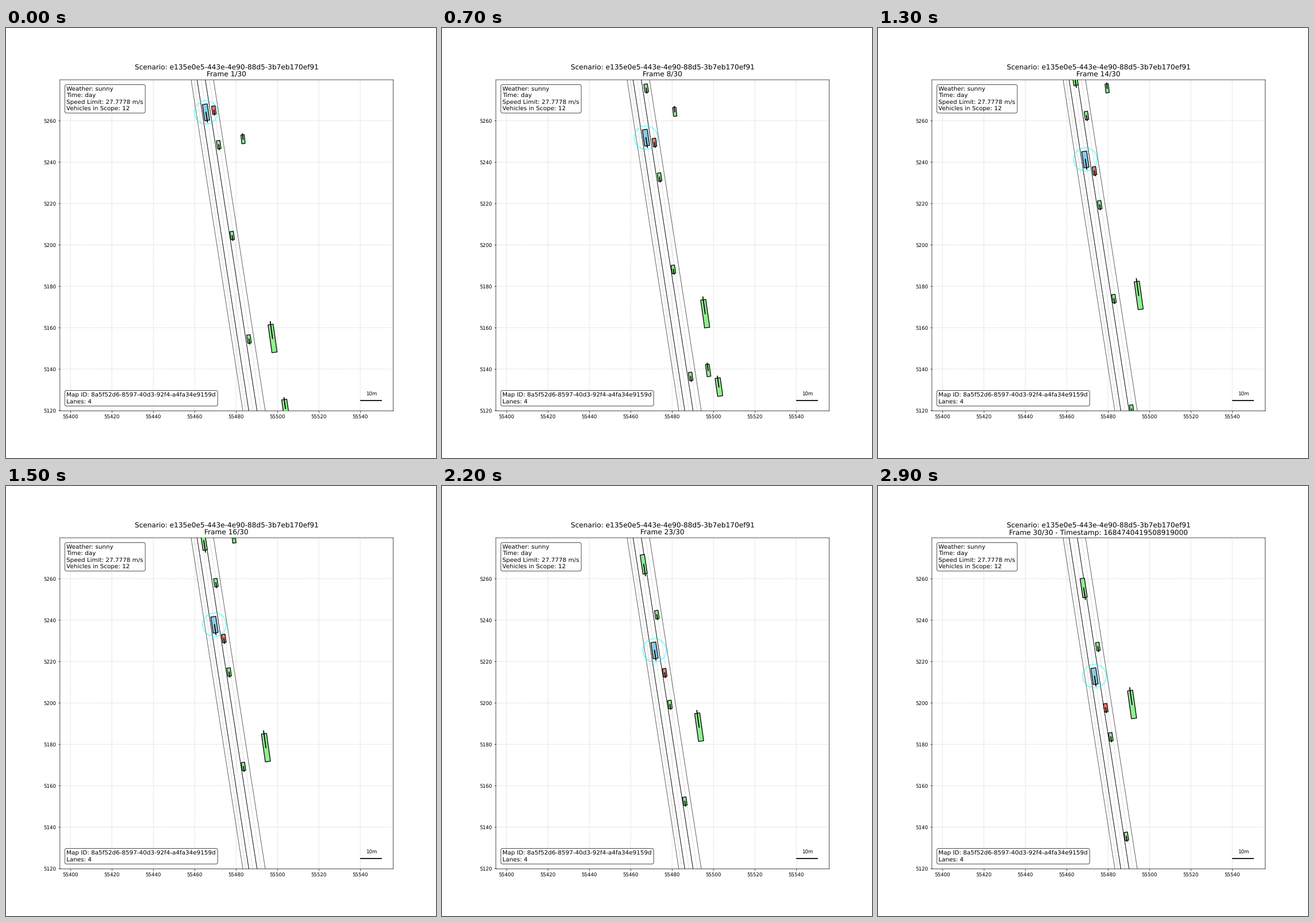
A matplotlib script that plays this animation: 748x748 px, repeating every 3000 ms.

```python
import numpy as np
import matplotlib
import matplotlib.pyplot as plt
from matplotlib.animation import FuncAnimation
from matplotlib.patches import Circle, Polygon

SIZE = 748
DPI = SIZE / 12
FRAMES = 30
HALF = 0.5 / 1200  # half a device pixel, as a share of the figure
BOX = [0.125 + HALF, 0.11 - HALF, 0.775, 0.77]
LEFT, TOP = BOX[0] * SIZE, (1 - BOX[1] - BOX[3]) * SIZE
WIDTH, HEIGHT = BOX[2] * SIZE, BOX[3] * SIZE
BOTTOM = TOP + HEIGHT
X0, Y0, SPAN = 55394.9, 5119.77, 160
SCALE = HEIGHT / SPAN  # stage pixels per metre
SCENARIO = "e135e0e5-443e-4e90-88d5-3b7eb170ef91"
MAP_ID = "8a5f52d6-8597-40d3-92f4-a4fa34e9159d"
STAMP = "1684740419508919000"


def pt(size):
    """Font size corrected for the whole-number dpi used for glyphs."""
    return size * DPI / int(DPI)


def to_map(px, py):
    """Stage pixels to map metres."""
    return X0 + (px - LEFT) / SCALE, Y0 + (BOTTOM - py) / SCALE


matplotlib.rcParams.update({
    "font.family": "DejaVu Sans", "text.hinting": "none",
    "xtick.labelsize": pt(10), "ytick.labelsize": pt(10)})

fig = plt.figure(figsize=(12, 12), dpi=DPI, facecolor="white")
ax = fig.add_axes(BOX)
ax.set_xlim(X0, X0 + WIDTH / SCALE)
ax.set_ylim(Y0, Y0 + SPAN)
ax.ticklabel_format(useOffset=False, style="plain")
ax.grid(True, linestyle="--", alpha=0.6, snap=False)
for spine in ax.spines.values():
    spine.set_snap(False)

# Road: parallel lane edges; a shared edge is drawn once for each lane.
DRIFT = 90 / HEIGHT
EDGES = (322.0, 332.4, 346.7, 361.0)


def road_line(x, **style):
    xs, ys = to_map(np.array([x, x + DRIFT * HEIGHT]), np.array([TOP, BOTTOM]))
    ax.plot(xs, ys, zorder=2, **style)


for left, right in zip(EDGES, EDGES[1:]):
    for edge in (left, right):
        road_line(edge, color="black", lw=1, alpha=0.7)
    road_line((left + right) / 2, color="gray", lw=0.8, ls="--", alpha=0.5)

# Scale bar
bar_x, bar_y = to_map(617.4, 647.8)
ax.plot([bar_x, bar_x + 10], [bar_y, bar_y], color="black", lw=2)
ax.text(bar_x + 5, bar_y + 2, "10m", ha="center", va="bottom",
        fontsize=pt(10))


def info_box(y, va, *lines):
    ax.text(0.02, y, "\n".join(lines), transform=ax.transAxes, va=va,
            fontsize=pt(12), zorder=10,
            bbox=dict(boxstyle="round", facecolor="white", alpha=0.8))


info_box(0.98, "top", "Weather: sunny", "Time: day",
         "Speed Limit: 27.7778 m/s", "Vehicles in Scope: 12")
info_box(0.02, "bottom", "Map ID: " + MAP_ID, "Lanes: 4")
title = ax.set_title("", fontsize=pt(14))


class Vehicle:
    """A box with a heading line, driving along a straight sloping track.

    motion holds the speed, then any higher polynomial terms, in stage
    pixels per step down the stage; drift is the sideways share of it.
    """

    def __init__(self, size, heading, start, motion, drift=DRIFT,
                 color="lightgreen", seen=(0, FRAMES)):
        self.start, self.motion, self.drift = start, motion, drift
        self.seen = seen
        length, width = size
        a = np.radians(heading)
        ahead = np.array([np.cos(a), np.sin(a)]) * length
        side = np.array([-np.sin(a), np.cos(a)]) * width / 2
        front, back = ahead / 2, -ahead / 2
        self.corners = np.array([front + side, front - side,
                                 back - side, back + side])
        self.nose = ahead * 0.6
        self.body = ax.add_patch(Polygon(self.corners, facecolor=color,
                                         edgecolor="black", lw=1.5, zorder=4))
        self.line, = ax.plot([], [], color="black", lw=2, zorder=5)

    def place(self, step):
        way = sum(c * step ** n for n, c in enumerate(self.motion, 1))
        x, y = self.start
        pos = np.array(to_map(x + self.drift * way, y + way))
        tip = pos + self.nose
        self.body.set_xy(self.corners + pos)
        self.line.set_data([pos[0], tip[0]], [pos[1], tip[1]])
        shown = self.seen[0] <= step <= self.seen[1]
        self.body.set_visible(shown)
        self.line.set_visible(shown)
        return pos


DOWN, UP = -81.6, 98
CAR = (4.0, 1.7)

ego = Vehicle((7.9, 2.4), DOWN, (347.9, 146.7), (6.27, 0.0027),
              color="skyblue")
others = [
    # same direction as the ego vehicle
    Vehicle(CAR, DOWN, (361.6, 142.8), (7.93, 0.0155), 0.142, color="salmon"),
    Vehicle(CAR, DOWN, (370.0, 203.0), (8.045,), 0.150),
    Vehicle(CAR, DOWN, (393.4, 361.0), (8.35, 0.0075), 0.155),
    Vehicle(CAR, DOWN, (422.7, 541.0), (9.22, 0.012), 0.152),
    Vehicle(CAR, DOWN, (346.5, 49.1), (7.937,)),
    Vehicle((9.3, 2.1), DOWN, (329.3, 6.8), (5.88,), 0.167),
    # oncoming
    Vehicle((4.3, 1.6), 96, (412.3, 193.4), (-6.8,), 0.155),
    Vehicle((13.6, 2.5), UP, (463.7, 540.0), (-6.82, 0.1117, -0.0023), 0.136),
    Vehicle((8.8, 2.5), UP, (486.2, 662.0), (-5.35,), 0.12, seen=(0, 7)),
    Vehicle((5.9, 1.8), UP, (468.5, 638.0), (-6.05,), 0.13, seen=(2, 7)),
]
halo = ax.add_patch(Circle((0, 0), 5.65, fill=False, edgecolor="cyan",
                           lw=2, alpha=0.5, zorder=3))


def draw(step):
    halo.center = tuple(ego.place(step))
    for vehicle in others:
        vehicle.place(step)
    label = f"Frame {step + 1}/{FRAMES}"
    if step == FRAMES - 1:
        label += f" - Timestamp: {STAMP}"
    title.set_text(f"Scenario: {SCENARIO}\n{label}")
    return []


anim = FuncAnimation(fig, draw, frames=FRAMES, interval=100, repeat=True,
                     repeat_delay=0, blit=False)
plt.show()
```
